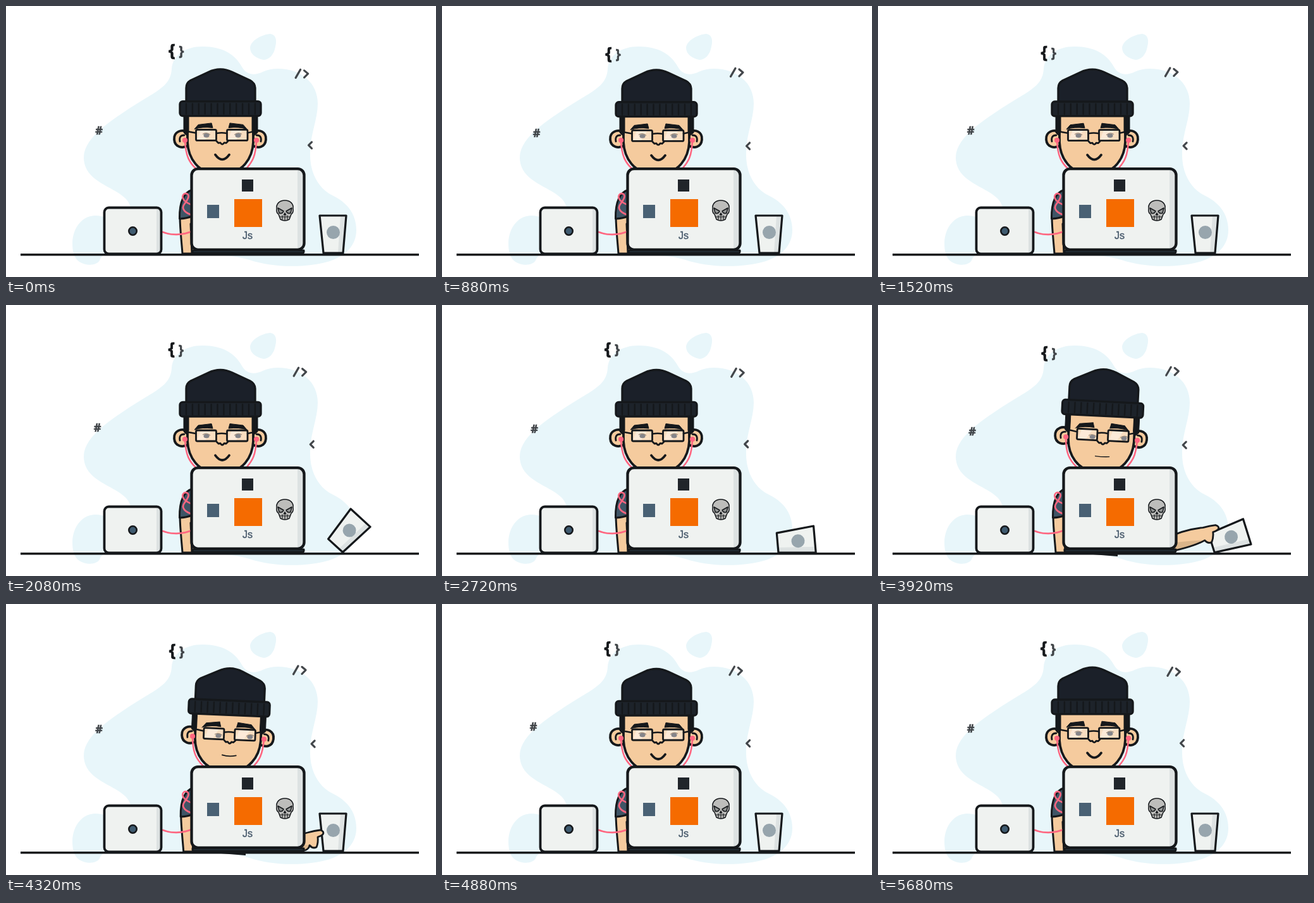
Animation of 680 by 428 pixels, one loop 5760 ms. Source, as an HTML page:

```html
<!DOCTYPE html>
<html lang="en">
<head>
<meta charset="utf-8">
<title>Coder at a desk</title>
<style>
  html, body { margin: 0; width: 100%; height: 100%; overflow: hidden; background: #fff; }
  svg { display: block; width: 680px; height: 428px; }
  .ink { stroke: #15181b; stroke-linejoin: round; stroke-linecap: round; }
  .line { fill: none; }
  .skin { fill: #f5cb9e; }
  .case { fill: #eff2f0; }
  .shade { fill: #dde2e2; }
  .cord { fill: none; stroke: #ff6680; stroke-width: 2.6; stroke-linecap: round; }
  .sign { font-family: "Noto Sans", sans-serif; font-weight: 700; fill: #3f4347; stroke: #3f4347; stroke-width: .6; text-anchor: middle; }
  .dark { fill: #15181b; stroke: #15181b; }
  .mark { fill: none; stroke: #43474b; stroke-width: 3.2; stroke-linecap: round; stroke-linejoin: round; }
</style>
</head>
<body>
<svg viewBox="0 0 680 428">
  <g fill="#e8f6fa">
    <path d="M262 99C264 77 284 64 311 64C342 64 362 76 373 96C381 111 396 109 406 104Q417 99 430 99C466 99 493 121 493 154C493 180 480 205 481 235C481 264 494 287 514 298C538 309 554 327 554 354C554 382 531 402 490 408C450 414 412 410 385 401C365 395 345 393 320 393H215C196 365 208 325 190 305C170 284 123 278 123 239C123 206 172 176 222 145C247 130 261 121 262 99Z"/>
    <path d="M105 374C106 350 120 332 140 331C165 330 182 350 176 375C168 388 152 390 148 402C143 410 127 411 116 404C107 398 105 386 105 374Z"/>
    <path d="M418 44C426 45 429 53 426 64C424 77 416 85 407 85C396 83 386 76 386 66C387 54 405 45 418 44Z"/>
  </g>

  <g id="braces">
    <text class="sign dark" x="0" y="7.400" font-size="27">{</text>
    <text class="sign" x="15" y="7" font-size="20.500">}</text>
  </g>
  <text id="hash" class="sign" y="6.500" font-size="18">#</text>
  <path id="close" class="mark" d="M-9.500 6.500L-2 -6.500M4 -5L10 0L4 6"/>
  <path id="less" class="mark" d="M2.500 -5L-2.500 0L2.500 5"/>

  <g id="body" stroke-width="3" class="ink">
    <path class="skin" d="M275 332C275 352 278 375 279 391H320V325Z"/>
    <path d="M296 290C280 294 274 310 274.500 336Q285 336 297 331L320 330V290Z" fill="#3f5566"/>
    <path d="M292 344L294 391" class="line"/>
  </g>
  <path class="cord" d="M248 357C260 362 278 363 296 355M296 331C284 327 276 321 282 313C287 306 291 300 287 297C281 294 277 300 281 306Q285 311 296 315"/>

  <g id="head">
    <g class="ink skin" stroke-width="3.800">
      <path d="M289 200C277 193 265 199 266 211C267 223 279 226 289 220Z"/>
      <path d="M389 200C401 193 412 199 411 211C410 223 399 226 389 220Z"/>
      <path stroke-width="2.800" fill="none" d="M282 204Q273 204 275 214M396 204Q405 204 403 214" style="fill:none"/>
      <path d="M287 172V215C288 238 302 266 339 266C376 266 390 238 391 215V172Z"/>
    </g>
    <path class="dark" d="M281 170H289V198L287 206L281 200ZM398 170H389V198L391 206L398 200Z"/>
    <g id="face">
      <path class="dark" d="M298 197L304 190L325 187.500L327 195Q310 193 298 197ZM381 197L375 190L354 187.500L352 195Q368 193 381 197Z"/>
      <g fill="#fff" fill-opacity=".36">
        <path d="M301 198H332V214H301ZM350 198H381V214H350Z"/>
        <path d="M308 198H325L315 214H302ZM357 198H374L364 214H351Z"/>
      </g>
      <g id="eyes">
        <ellipse cx="317" cy="207" rx="4.500" ry="3.300" fill="#85858a"/>
        <ellipse cx="367" cy="207" rx="4.500" ry="3.300" fill="#85858a"/>
        <path d="M311 205Q317 201 323 206M361 206Q367 201 373 205" class="line" stroke="#9b8b7b" stroke-width="1.200"/>
      </g>
      <g class="ink line" stroke-width="2.800">
        <rect x="300.500" y="198" width="32" height="17" rx="2"/>
        <rect x="349.500" y="198" width="32.500" height="17" rx="2"/>
        <path d="M333 203.500Q341 202 349 203.500M300 203L289 201M382 203L391 201" stroke-width="2.500"/>
        <path d="M333 216L336 219L339 218.500Q342 223.500 345 218.500L348 219L351 216"/>
        <path id="mouth"/>
      </g>
      <path class="ink" stroke-width="3.300" fill="#1b2029" d="M285 154V132Q285 124 292 120L320 107Q339 98 358 107L386 120Q393.500 124 394 132V154Z"/>
      <rect class="ink" x="275" y="153.300" width="128" height="22.900" rx="4.500" stroke-width="3.300" fill="#1d232a"/>
      <path id="ribs" class="ink line" stroke-width="2.400"/>
    </g>
    <g class="cord">
      <path d="M283 212C284 236 289 248 305 261M396 212C395 236 391 246 376 261"/>
      <path d="M283 212h.1M396 212h.1" stroke-width="8"/>
    </g>
  </g>

  <path d="M23 392.800H653" stroke="#15181b" stroke-width="3.600"/>

  <g id="cup">
    <path class="case" d="M496 331H538L533 390H502Z"/>
    <path class="shade" d="M529 331H538L533 390H525Z"/>
    <circle cx="517.500" cy="357.500" r="10.500" fill="#97a5ad"/>
    <path class="ink line" stroke-width="3.200" d="M496 331H538L533 390H502Z"/>
  </g>
  <g id="arm">
    <path id="limb" class="skin"/>
    <path id="under" fill="#dab58a"/>
    <path id="edge" class="ink line" stroke-width="2.800"/>
  </g>

  <path id="lap" d="M298 387H379V397L340 394Z" fill="#15181b"/>
  <path class="ink" stroke-width="3" fill="#2e3e4b" d="M295 386H471V388Q471 390 468 390H298Q295 390 295 388Z"/>
  <rect class="case" x="293.500" y="257.200" width="178" height="127.600" rx="10"/>
  <path class="shade" d="M461 258Q471 259 471 268V375Q471 384 461 384Z"/>
  <rect class="ink line" x="293.500" y="257.200" width="178" height="127.600" rx="10" stroke-width="4.300"/>

  <rect x="373" y="274" width="18" height="19" fill="#20252a"/>
  <rect x="318" y="314" width="19" height="21" fill="#496174"/>
  <rect x="361" y="305" width="44" height="44" fill="#f56b00"/>
  <text x="382" y="368" text-anchor="middle" font-size="16" fill="#46586a" stroke="#46586a" stroke-width=".4" font-family="'Liberation Sans', Arial, sans-serif">Js</text>

  <g class="ink" stroke-width="1.500">
    <path fill="#bdbdbb" d="M441 307C450 307 455 313 454 320Q455 326 451 329L448 337Q441 341 434 337L431 329Q427 326 428 320C427 313 432 307 441 307Z"/>
    <path fill="#929594" d="M430 319L439 324Q437 329 432 327ZM452 319L443 324Q445 329 450 327ZM441 327L442.500 330H439.500Z"/>
    <path class="line" stroke-width="1.100" d="M433 333H449M437 331V337M441 332V338M445 331V337"/>
  </g>

  <rect class="case" x="155.500" y="318.500" width="90" height="73" rx="7"/>
  <path class="shade" d="M238 319Q245 319 245 326V384Q245 391 238 391Z"/>
  <rect class="ink line" x="155.500" y="318.500" width="90" height="73" rx="7" stroke-width="3.800"/>
  <circle class="ink" cx="200.500" cy="355.500" r="6.200" fill="#3f5b70" stroke-width="2.600"/>
</svg>
<script>
const LOOP = 5760, STEP = 80, DRIFT = 2880;
const el = id => document.getElementById(id);
const set = (id, name, value) => el(id).setAttribute(name, value);
const mix = (a, b, u) => a + (b - a) * u;
const wave = (t, peak, period) => Math.cos(2 * Math.PI * (t - peak) / period);

// Smooth step from 0 to 1 that begins at `from` and takes `span` ms.
function ramp(t, from, span) {
  const u = Math.min(1, Math.max(0, (t - from) / span));
  return u * u * (3 - 2 * u);
}

// Slow float around (x, y): sway and rise, each with the time of its peak.
function float(id, t, x, sway, xPeak, y, rise, yPeak) {
  const px = x + sway * wave(t, xPeak, DRIFT), py = y + rise * wave(t, yPeak, DRIFT);
  set(id, "transform", `translate(${px} ${py})`);
}

function drawArm(x, y) {
  const mid = (450 + x) / 2;
  const top = `M450 371Q${mid - 8} ${y - 3} ${x - 16} ${y - 6}`;
  const hand = `Q${x - 5} ${y - 9} ${x + 4} ${y - 10}Q${x + 11} ${y - 8} ${x + 8} ${y - 3}`
    + `Q${x + 4} ${y} ${x} ${y + 1}Q${x + 1} ${y + 10} ${x - 2} ${y + 17}Q${x - 8} ${y + 20} ${x - 13} ${y + 14}`;
  const low = `Q${mid + 8} ${y + 25} 450 392`;
  set("limb", "d", top + hand + low + "Z");
  set("edge", "d", top + hand + low);
  set("under", "d", `M${x - 13} ${y + 14}${low}V378Q${mid} ${y + 14} ${x - 13} ${y + 14}Z`);
}

function draw(t) {
  float("braces", t, 262.6, 0.9, 900, 73, 3.2, 980);
  float("hash", t, 147.1, 2.7, 720, 197, 3.5, 740);
  float("close", t, 465.8, 2, 200, 105.6, 1.3, 2780);
  float("less", t, 483.3, 2.3, 1450, 220.4, 0.7, 1100);

  const lean = ramp(t, 3000, 520) * (1 - ramp(t, 4200, 500));
  const nodding = t < 1800 || t > 5400;
  const lift = nodding ? 1.3 * (1 + wave(t, 0, 720)) : 0;
  set("head", "transform", `translate(${14 * lean} ${-lean}) rotate(${2.8 * lean} 339 212)`);
  set("face", "transform", `translate(0 ${-lift})`);
  set("eyes", "transform", `translate(${8 * lean} ${3 * lean})`);
  const lip = mix(237.5, 240, lean);
  set("mouth", "d", `M331 ${lip}Q342 ${lip + mix(15, 1, lean)} 353 ${lip}`);
  set("mouth", "stroke-width", mix(3.8, 1.4, lean));
  set("body", "transform", `translate(${2 * lean} 0)`);
  set("lap", "opacity", lean > 0.6 ? 1 : 0);

  const lifted = ramp(t, 3800, 500);
  const fallen = ramp(t, 1930, 300) * (1 - lifted);
  set("cup", "transform", `translate(${-fallen} ${fallen}) rotate(${85 * fallen} 533 390)`);

  const out = ramp(t, 3160, 600) * (1 - ramp(t, 4400, 560));
  drawArm(mix(425, mix(536, 493, lifted), out), mix(368, mix(356, 367, lifted), out));
  set("arm", "visibility", out > 0 ? "visible" : "hidden");
}

let ribs = "";
for (let x = 285; x < 400; x += 9.9) ribs += `M${x} 157V173`;
set("ribs", "d", ribs);

const start = performance.now();
function tick() {
  const t = (performance.now() - start) % LOOP;
  draw(Math.floor(t / STEP) * STEP);
  requestAnimationFrame(tick);
}
tick();
</script>
</body>
</html>
```
